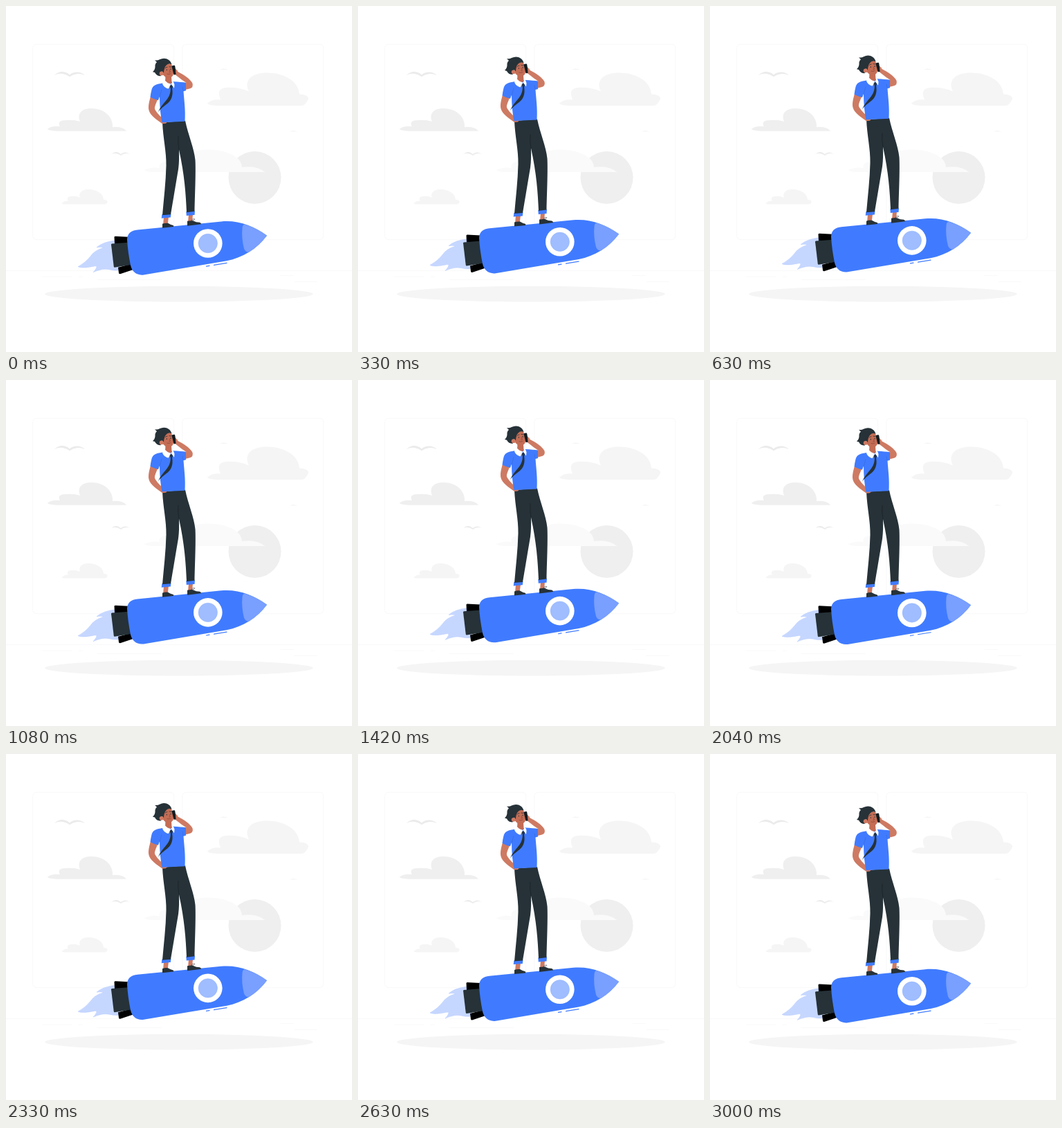
An HTML page for the animation above (3040 ms loop, 500x500 px).

```html
<!DOCTYPE html>
<html lang="en">
<head>
<meta charset="utf-8">
<title>Rocket ride</title>
<style>
  html, body { margin: 0; width: 100%; height: 100%; overflow: hidden; background: #fff; }
  svg { display: block; width: 100vw; height: 100vh; }
  .blue { fill: #407bff; }
  .dark { fill: #263238; }
  .skin { fill: #ce7a63; }
  .face { fill: #c46d55; }
  .white { fill: #fff; }
</style>
</head>
<body>
<svg viewBox="0 0 500 500">
  <g id="backdrop">
    <g fill="#ebebeb">
      <rect y="382.4" width="500" height=".3"/>
      <rect x="416.8" y="398.5" width="33.1" height=".3"/>
      <rect x="396.6" y="389.2" width="19.2" height=".3"/>
      <rect x="52.5" y="390.9" width="43.2" height=".3"/>
      <rect x="104.6" y="390.9" width="6.3" height=".3"/>
      <rect x="131.5" y="395.1" width="93.7" height=".3"/>
    </g>
    <g fill="none" stroke="#ebebeb" stroke-width=".35">
      <rect x="38.6" y="55.3" width="204" height="282.3" rx="5.7"/>
      <rect x="254.8" y="55.3" width="204" height="282.3" rx="5.7"/>
    </g>
    <circle cx="359.5" cy="248" r="38" fill="#efefef"/>
    <path fill="#fafafa" d="M200 237Q209 232 222 234Q219 226 232 225Q246 223 259 226C264 211 277 207 291 207.500C318 207 341 218 341 233Q362 230 374 240H210Q201 239 200 237Z"/>
    <path fill="#f5f5f5" d="M291 140.500Q298 134.500 310 135.500Q303 119 318 118Q337 117 351 123.500C343 107 355 96.500 377 96.500C404 96.500 423 110 424 127.500Q437 128 437 134Q433 144 427 144H304Q292 143.500 291 140.500Z"/>
    <path fill="#efefef" d="M60 178Q65 173 78 174Q73 165 87 165Q98 164 107 167C102 154 111 148 123 148C142 148 155 160 154 175Q169 174 174 180.700H73Q62 180 60 178Z"/>
    <path fill="#f5f5f5" d="M81 285Q84 281 90 281.500Q86 276 94 275Q102 274 107 277C104 269 111 265 119 265C132 265 141 272 141 280Q147.500 280 146.500 284Q144.500 286.500 142.500 286.500H85Q81 286.500 81 285Z"/>
    <g fill="#ebebeb">
      <path d="M70 100Q78 92.500 87 96.300Q90 97.300 92 99.500Q96 95.500 103 95.500Q109 95.500 114 100Q107 97 102 98.300Q97 99 92 102.300Q87 99 82 98Q76 97 70 100Z"/>
      <path d="M152 214Q157 210 162 211.500L166 214Q172 209 179 214Q171 211.500 166 216Q160 211.500 152 214Z"/>
      <path d="M309 91.500Q314 90 321 91.500ZM410 181.200Q415 180 421 181.200Z"/>
    </g>
    <ellipse cx="250" cy="416.2" rx="193.9" ry="11.3" fill="#f5f5f5"/>
  </g>

  <g id="flyer">
    <path fill="#c6d7ff" stroke="#adc6ff" stroke-width=".4" d="M158 338Q140 340 131 348Q137 347 141 348.500Q128 352 122 361Q115 370 104 376Q110 379 129 375Q134 375 126 384Q139 378 149 380Q156 382 164 381Z"/>
    <path d="M156.500 333Q157 332 158 332L177 333V344L157 343ZM162 377L181 372L183 380.500L165 386.500Q163 386.500 163 385Z"/>
    <path class="dark" d="M152 344Q152 343 153 342.800L177 341L182 373L157 377Q156 377 155.800 376Z"/>
    <path class="blue" d="M175 337C175 328 181 323.500 190 322.700L311 310.600C336 308.500 358 317 377 331C363 350 342 363 319 367.500L199 387.700C189 389 182 383 180 374Q176 354 175 337Z"/>
    <path fill="#799fff" d="M345 315Q362 320 377 331Q366 346 351 355Q346 355 344 350Q340 334 341.500 320Q342 315 345 315Z"/>
    <circle class="white" cx="291.800" cy="342.200" r="20.800"/>
    <circle cx="291.800" cy="342.200" r="13.700" fill="#9fbdff" stroke="#8cb0ff" stroke-width=".5"/>
    <path fill="none" stroke="#407bff" stroke-width="1.200" stroke-linecap="round" d="M289.500 375.300L294 374.500M300.500 373.500L319 370.500"/>

    <path class="skin" d="M228 304L235 304L233.500 316H227ZM264 300L270 300L269 312H263Z"/>
    <path class="dark" d="M226 314Q230 312.500 234 313Q238 315.500 241 316Q243 316.500 242 318.300L226 320ZM262 310Q267 309 270 309.500Q275 312 280 312Q282 312.500 282 314.500L262 317Z"/>
    <path fill="none" stroke="#263238" stroke-width=".5" d="M268 309Q269 306 273 307Q273 309 268 309.500"/>
    <path class="blue" d="M225.300 300.500L238.500 299.500L237.800 304.800L224.700 306ZM260.300 296.500L273 295.500L272.500 301.300L260.800 302.300Z"/>
    <path class="dark" d="M226 167.500L259 165C263 185 272 205 273.500 222C274.500 240 273 272 272.500 296L261 297.500C260 272 258 243 250 207C250.300 217 250.200 226 249 235L238 300.500L226 301.500C228 278 231 254 231.500 230C232 210 227 191 226 167.500Z"/>
    <path fill="none" stroke="#000" stroke-opacity=".45" stroke-width=".6" d="M250 207Q248 197 249 187"/>

    <path class="skin" d="M209 130L219 134C217 141 213 146 216 150C219 155 224 159.500 227 162.500L232.500 163Q234.500 166 231 169L226 169.500C218 164 208 157 206.500 150C205 144 207 137 209 130Z"/>
    <path class="skin" d="M244 91Q247 91 248 94C256 98 267 105 269.500 111Q271 117 266 118.500L256 121L255 111L260.500 110C255 107 248 101 244 98Z"/>
    <path class="blue" d="M225 111C217 112 212 114 210.500 120Q209 126 208.500 131Q214 134 220 135.500L222 130Q222 151 225.500 167.500L258.500 166C259.500 149 257.500 137 256.500 122.500L260 121.500V110Q253 109 242 108.500Z"/>
    <path fill="none" stroke="#2c57b5" stroke-opacity=".65" stroke-width=".5" d="M222 131L225 120M256 122L255 116"/>
    <path class="face" d="M230 98L239 101L239.500 109L237 113L229 109Q231 107 230 98Z"/>
    <path class="white" d="M229.500 106.500Q233 111 238.500 112L234.500 119Q228 117 226 111.500ZM238.500 112Q240.500 110 240 107Q243 109 243.500 113L243 118Z"/>
    <path class="dark" d="M236.700 115L238.800 113L241 115.500L240.200 119C241.500 128 239.500 135 233.500 140C227 145 223 148 220 152.500C222 147 225.500 143 229.500 138C235 132 238 126 237.800 119Z"/>

    <path class="face" d="M226 85Q232 81 239 83Q241 88 242 94.500Q243 101.500 236 103Q230 103 227 98.500Z"/>
    <path class="dark" d="M228 96.500L225.500 93.500L223.500 100.500Q217.500 100.500 215 95.300L212 94.500Q215.500 91 215.500 87Q215 83 218 80.500L215 77.500Q219 78.300 222 76.500C229 73 237 75.500 239.500 83.500Q234.500 81.500 231.500 85Q228 88.500 228 96.500Z"/>
    <ellipse class="skin" cx="224.700" cy="96.700" rx="3" ry="2.900"/>
    <g class="dark">
      <ellipse cx="232.300" cy="91.500" rx=".6" ry=".9"/>
      <ellipse cx="238" cy="90.500" rx=".6" ry=".9"/>
    </g>
    <path fill="none" stroke="#263238" stroke-width=".8" stroke-linecap="round" d="M230 89Q231 87.500 233 87.500M236 87L238.500 87.300"/>
    <path fill="none" stroke="#7d392e" stroke-width=".6" stroke-linecap="round" d="M236 91.500L237.500 94.500L235.800 94.900M233 97.500Q235.500 98.600 237.800 97"/>
    <path fill="#111c21" d="M239.500 86.500Q239.500 85.500 240.500 85.500L243 85Q244 85 244.200 86L246 97Q246 98.300 245 98.300L242.500 98.700Z"/>
    <path class="skin" d="M245 90L248 93L247 98L245.500 98Z"/>
  </g>
</svg>
<script>
  const LOOP = 3040;
  const LIFT = 10;
  const BASE = 0.8;
  const flyer = document.getElementById('flyer');

  // Linear rise for half the loop, then a linear fall.
  function draw(time) {
    const phase = (time % LOOP) / LOOP;
    const rise = LIFT * (1 - Math.abs(1 - 2 * phase));
    flyer.setAttribute('transform', `translate(0 ${BASE - rise})`);
  }

  const start = performance.now();
  function tick() {
    draw(performance.now() - start);
    requestAnimationFrame(tick);
  }
  tick();
</script>
</body>
</html>
```
